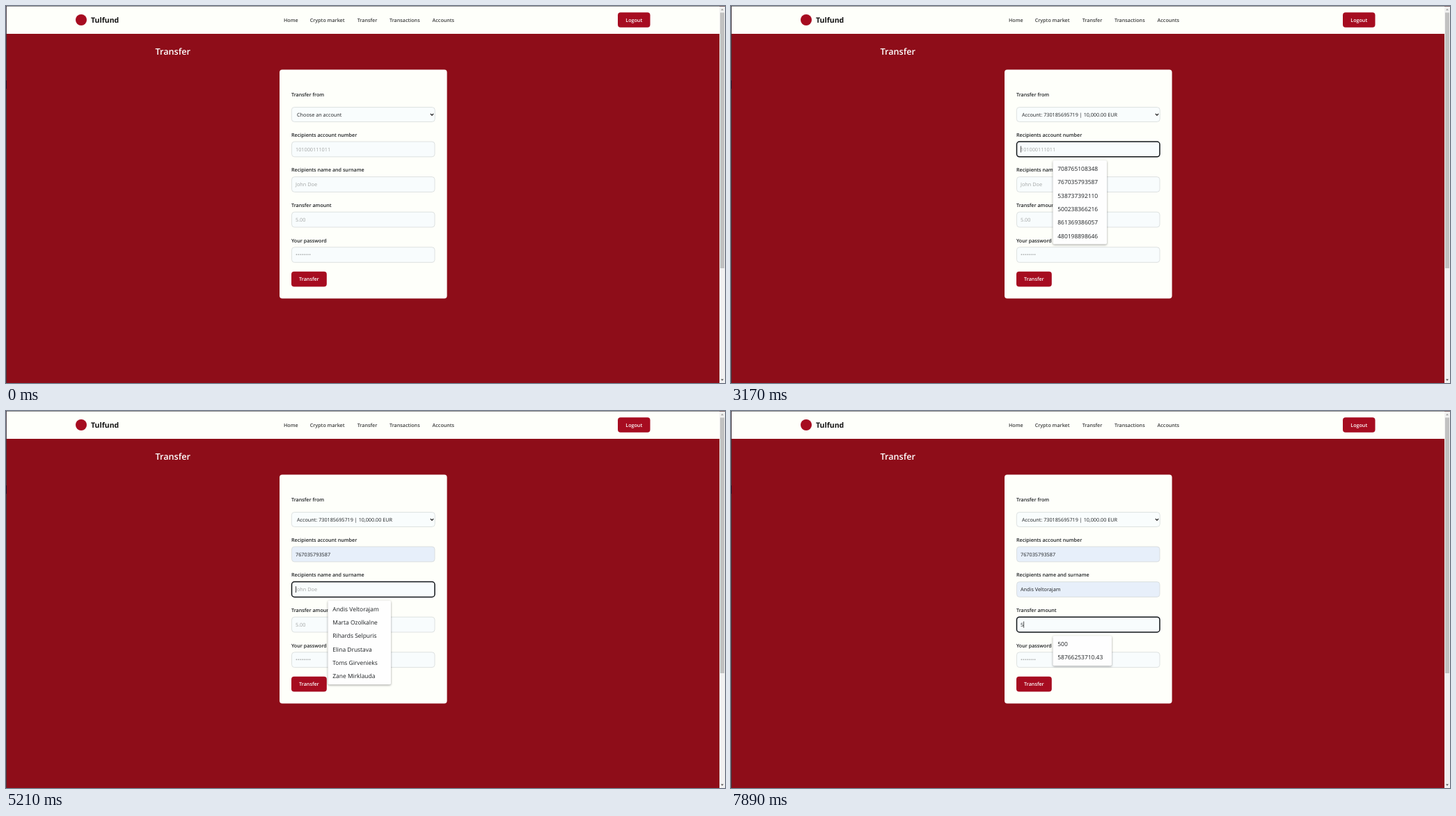
Write an HTML page that moves like this. It is 1033 px wide and 542 px high and loops after 7.99 s.

```html
<!DOCTYPE html>
<html lang="en">
<head>
<meta charset="utf-8">
<title>Transfer form</title>
<style>
  html, body { margin: 0; width: 100%; height: 100%; overflow: hidden; background: #8e0d19; }
  svg { display: block; width: 100%; height: 100%; }
  text {
    font: 400 7.25px "Open Sans", "Noto Sans", sans-serif;
    fill: #1c1f22; text-rendering: geometricPrecision; white-space: pre;
  }
  .strong { font-weight: 600; font-size: 7.15px; }
  .nav { fill: #3c3d3d; }
  .white { fill: #fff; }
  .mid { text-anchor: middle; }
  .brand { font-weight: 700; font-size: 10.5px; fill: #111; }
  .title { font-weight: 600; font-size: 12.65px; fill: #fff; }
  .hint { fill: #a2a5a5; font-size: 7.3px; }
  .value { font-size: 7.3px; }
  .item { font-size: 8.45px; }
  .shadow { filter: drop-shadow(0 1px 1.4px rgba(0, 0, 0, .38)); }
</style>
</head>
<body>
<svg viewBox="0 0 1033 542" preserveAspectRatio="none">
  <g id="page"></g>
  <g id="form"></g>
</svg>
<script>
const LOOP = 7990;
const PAPER = '#fefffa', RED = '#a60c20', FILLED = '#e7effa', EMPTY = '#f8fcfd';
const LEFT = 410, WIDTH = 206.5;
const NAME = 'Andis Veltorajam';

const options = [
  'Choose an account',
  'Account: 179326068415 | 98,766,253,710.43 AED',
  'Account: 730185695719 | 10,000.00 EUR',
  'Account: 161415339175 | 10.40 GBP'
];
const numbers = ['708765108348', '767035793587', '538737392110',
                 '500238366216', '861369386057', '480198898646'];
const people = [NAME, 'Marta Ozolkalne', 'Rihards Selpuris', 'Elina Drustava', 'Toms Girvenieks', 'Zane Mirklauda'];
const amounts = ['500', '100', '1000000.00', '50', '2000', '10'];
const fields = [
  { label: 'Recipients account number', hint: '101000111011', y: 194.7 },
  { label: 'Recipients name and surname', hint: 'John Doe', y: 245.3 },
  { label: 'Transfer amount', hint: '5.00', y: 295.9 },
  { label: 'Your password', hint: '••••••••', y: 346.5 }
];

// Each step changes part of the form state; everything else carries over.
const steps = [
  [0, { chosen: 0, list: -1, ring: false, focus: -1, caret: false, values: [], items: null,
        hover: -1, fade: 1, right: 540, spell: false }],
  [1230, { list: 0, ring: true }],
  [1840, { list: 1 }],
  [1940, { list: 2 }],
  [2660, { list: -1, chosen: 2 }],
  [2970, { ring: false, focus: 0, caret: true }],
  [3170, { items: numbers }],
  [3570, { hover: 0, caret: false, values: [numbers[0]] }],
  [3780, { hover: 1, values: [numbers[1]] }],
  [3990, { caret: true }],
  [4090, { fade: .7 }],
  [4190, { fade: .35 }],
  [4290, { fade: .12 }],
  [4390, { items: null, hover: -1, fade: 1 }],
  [4700, { focus: 1 }],
  [5010, { caret: false }],
  [5210, { caret: true, items: people, right: 553 }],
  [5420, { hover: 0, caret: false, values: [numbers[1], NAME] }],
  [5830, { caret: true, spell: true, fade: .7 }],
  [5930, { fade: .3 }],
  [6030, { items: null, hover: -1, fade: 1 }],
  [6240, { focus: 2, spell: false, items: amounts, right: 541 }],
  [6860, { caret: false }],
  [7370, { caret: true }],
  [7580, { values: [numbers[1], NAME, '5'], items: ['500', '58766253710.43'], right: 547 }]
];
let carried = {};
const states = steps.map(([time, change]) => ({ time, ...(carried = { ...carried, ...change }) }));

const rect = (x, y, w, h, fill, more = '') =>
  `<rect x="${x}" y="${y}" width="${w}" height="${h}" fill="${fill}" ${more}/>`;
const text = (x, y, str, cls = '', more = '') =>
  `<text x="${x}" y="${y}" class="${cls}" ${more}>${str}</text>`;
const button = (x, y, w, h, label) =>
  rect(x, y, w, h, RED, 'rx="4"') + text(x + w / 2, y + h / 2 + 2.6, label, 'strong white mid');

function drawPage() {
  const nav = [['Home', 399], ['Crypto market', 436.7], ['Transfer', 504.7],
               ['Transactions', 551], ['Accounts', 612.6]];
  return rect(0, 0, 1033, 542, '#8e0d19')
    + rect(0, 0, 1025, 40, PAPER)
    + rect(0, 0, 1033, .8, '#77797a')
    + rect(0, 0, .9, 542, '#41363f')
    + rect(0, 107, 1, 12, '#1d1830')
    + `<circle cx="108" cy="20" r="8" fill="${RED}"/>`
    + text(122, 23.6, 'Tulfund', 'brand')
    + nav.map(([label, x]) => text(x, 22.6, label, 'strong nav')).join('')
    + button(879, 9.2, 46.5, 21.6, 'Logout')
    + text(214.5, 70, 'Transfer', 'title')
    + rect(393, 91.5, 240.6, 329, PAPER, 'rx="4"')
    + text(LEFT, 129.6, 'Transfer from', 'strong')
    + fields.map(f => text(LEFT, f.y - 7, f.label, 'strong')).join('')
    + button(LEFT, 381.7, 50.8, 21.8, 'Transfer')
    + rect(1025, 1, 8, 541, '#f1f1f1')
    + rect(1026, 9.5, 6, 367.5, '#c1c1c1')
    + '<path d="M1027 6.2l2-2.4 2 2.4z" fill="#a3a3a3"/>'
    + '<path d="M1027 536.4l2 2.4 2-2.4z" fill="#505050"/>';
}

function drawSelect(s) {
  const stroke = s.ring ? '#3f86b8' : '#d2d6d6';
  return rect(LEFT + .3, 145.6, WIDTH - .6, 20.8, '#f9fdfd',
              `rx="4" stroke="${stroke}" stroke-width="${s.ring ? 1 : .7}"`)
    + text(418, 158.6, options[s.chosen])
    + '<path d="M609.8 154.9l2.2 2.3 2.2-2.3" fill="none" stroke="#111" stroke-width="1.2"/>';
}

function drawField(s, f, i) {
  const value = s.values[i], focused = s.focus === i;
  const typed = i === 2;
  const stroke = focused ? '#101418' : '#d2d6d6';
  return rect(LEFT + .5, f.y + .3, WIDTH - 1, 21.8, value && !typed ? FILLED : EMPTY,
              `rx="4" stroke="${stroke}" stroke-width="${focused ? 1.5 : .7}"`)
    + text(416, f.y + 13.8, value || f.hint, value ? 'value' : 'hint', `id="field${i}"`);
}

function drawList(s) {
  const rowHeight = 9.55, top = 167;
  const rows = options.map((label, i) => {
    const y = top + i * rowHeight, active = i === s.list;
    const fill = i ? '#2294f5' : '#c6c6c6';
    const color = active ? (i ? '#fff' : '#f2f2f2') : (i ? '#1c1f22' : '#8b8b8b');
    return (active ? rect(LEFT + .4, y, WIDTH - .8, rowHeight, fill) : '')
      + text(418, y + 7.2, label, '', `style="fill:${color}"`);
  });
  return rect(LEFT + .2, 166.7, WIDTH - .4, 39.5, '#fdfdfd',
              'class="shadow" stroke="#767676" stroke-width=".6"') + rows.join('');
}

function drawPopup(s) {
  const x = 462.5, y = fields[s.focus].y + 27.3, rowHeight = 19.36;
  const w = s.right - x, h = s.items.length * rowHeight + 4.4;
  const shift = s.fade < 1 ? 'transform="translate(1.3 2)"' : '';
  const rows = s.items.map((label, i) => {
    const rowY = y + 2 + i * rowHeight;
    return (i === s.hover ? rect(x, rowY, w, rowHeight, '#e4e5e4') : '')
      + text(469.3, rowY + 12.9, label, 'item');
  });
  return `<g opacity="${s.fade}" ${shift}>`
    + rect(x, y, w, h, '#fefefe', 'rx="2" class="shadow"') + rows.join('') + '</g>';
}

const form = document.getElementById('form');

// Caret and spelling marks depend on the measured text.
function drawMarks(s) {
  const { y } = fields[s.focus];
  const node = document.getElementById('field' + s.focus);
  const value = s.values[s.focus] || '';
  let marks = '';
  if (s.caret) {
    const x = 416.2 + (value ? node.getComputedTextLength() : 0);
    marks += rect(x, y + 6.6, .7, 9.2, '#111');
  }
  if (s.spell) {
    let start = 0;
    for (const word of value.split(' ')) {
      const x = 416 + (start ? node.getSubStringLength(0, start) : 0);
      marks += rect(x, y + 14.9, node.getSubStringLength(start, word.length), .7, '#e0464c');
      start += word.length + 1;
    }
  }
  return marks;
}

function drawForm(s) {
  form.innerHTML = drawSelect(s) + fields.map((f, i) => drawField(s, f, i)).join('');
  let overlay = '';
  if (s.focus >= 0) overlay += drawMarks(s);
  if (s.list >= 0) overlay += drawList(s);
  if (s.items) overlay += drawPopup(s);
  form.insertAdjacentHTML('beforeend', overlay);
}

document.getElementById('page').innerHTML = drawPage();
const start = performance.now();
let shown = null;
function tick() {
  const t = (performance.now() - start) % LOOP;
  const state = states.findLast(s => s.time <= t);
  if (state !== shown) drawForm(shown = state);
  requestAnimationFrame(tick);
}
tick();
</script>
</body>
</html>
```
